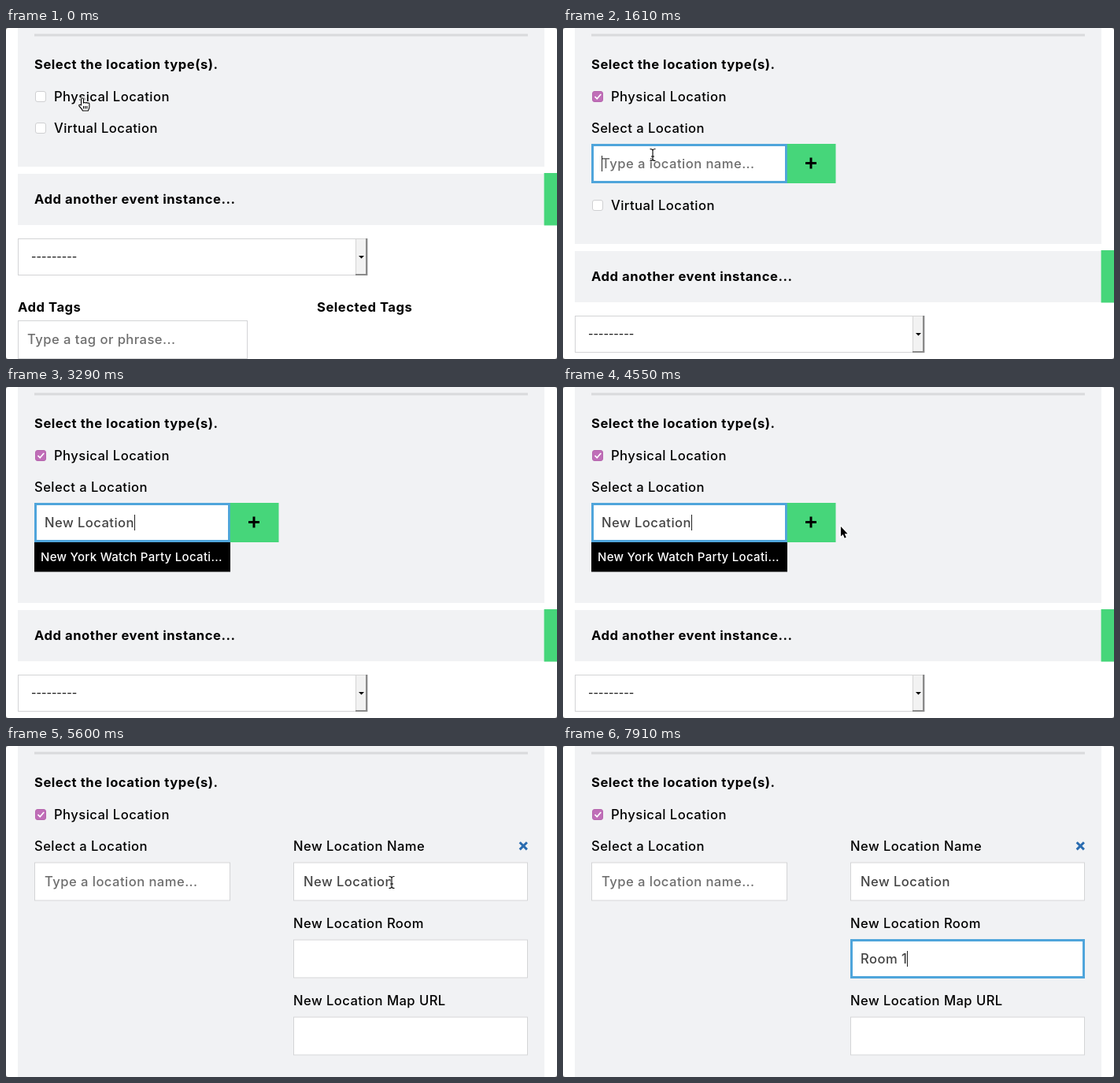
An HTML page with a canvas for the animation above (8000 ms loop, 700 by 420 pixels).

```html
<!DOCTYPE html>
<html lang="en">
<head>
<meta charset="utf-8">
<title>Event location form</title>
<style>
  html, body { margin: 0; width: 100%; height: 100%; overflow: hidden; background: #fff; }
  canvas { display: block; }
</style>
</head>
<body>
<canvas id="stage" width="700" height="420"></canvas>
<script>
const ctx = document.getElementById('stage').getContext('2d');
const LOOP = 8000;
const PANEL = '#f1f2f4', GREEN = '#46d67a', BLUE = '#4fa5db', BORDER = '#d3d4d6';
const HINT = '#6e6e6e', INK = '#444';

// Moments of the interaction, in ms
const CHECKED = 420, FOCUS_SEARCH = 1260, LIST_OPEN = 2170, LIST_NARROW = 2870;
const ADD_CLICK = 4900, FOCUS_ROOM = 6360;

const searchKeys = [[1890, 'N'], [2100, 'e'], [2170, 'w'],
  ...[...' Location'].map((c, i) => [2660 + i * 51, c])];
const roomKeys = [[7210, 'R'], [7420, 'o'], [7490, 'o'], [7560, 'm'], [7700, ' '], [7910, '1']];

// Asterisks mark the matching part of a suggestion
const suggestions = ['38th Meadow Park, *New* Harl...', '*New* York Watch Party Locati...',
  '*New*berry College', 'The Tinsmith Restaurant, 2...', 'Jonathan R. *New*lark Nature ...'];

// time, x, y, pointer shape until the next entry
const pointerPath = [
  [0, 97, 89, 'hand'], [70, 97, 89, 'hand'], [140, 101, 92, 'hand'], [490, 101, 92, 'hand'],
  [770, 108, 125, 'beam'], [1050, 114, 161, 'beam'], [1890, 114, 161, null],
  [4060, 114, 161, 'beam'], [4270, 288, 178, 'hand'], [4410, 348, 184, 'arrow'],
  [4550, 353, 177, 'arrow'], [4690, 344, 176, 'hand'], [4830, 318, 172, 'hand'],
  [4900, 318, 172, 'arrow'], [5110, 318, 172, 'arrow'], [5320, 368, 172, 'beam'],
  [5600, 490, 173, 'beam'], [5740, 490, 173, 'beam'], [6020, 484, 270, 'beam'],
  [6230, 477, 256, 'beam'], [7210, 477, 256, null], [LOOP, 477, 256, null]];

const shapes = {
  hand: new Path2D('M-1.5 9V1.5a1.5 1.5 0 0 1 3 0V6q1.3-1 2.6 0q1.3-.8 2.6.2q1.6-.6 2.2.8V11' +
    'q0 2-1.5 5h-7q-1-2.5-4.5-6q-.6-2 1-1.7zM1.5 10v3.5M3.7 10v3.5M5.9 10v3.5'),
  arrow: new Path2D('M0 0V12.5l2.8-2.6 2 4.8 2-.9-2-4.6h3.8z'),
  beam: new Path2D('M-3.5-7.5q3.5 0 3.5 2 0-2 3.5-2M0-5.5v11M-3.5 7.5q3.5 0 3.5-2 0 2 3.5 2M-2 2h4')
};

const clamp = v => Math.max(0, Math.min(1, v));
const progress = (t, start, length) => clamp((t - start) / length);
const swing = p => 0.5 - Math.cos(p * Math.PI) / 2;
const typed = (keys, t) => keys.filter(k => k[0] <= t).map(k => k[1]).join('');

function rect(x, y, w, h, color) {
  ctx.fillStyle = color;
  ctx.fillRect(x, y, w, h);
}

// Draws text centred on y and returns the x where it ends
function text(str, x, y, { color = '#000', weight = 500, size = 16.6, spacing = 0.45 } = {}) {
  ctx.font = `${weight} ${size}px Inter, sans-serif`;
  ctx.letterSpacing = spacing + 'px';
  ctx.fillStyle = color;
  ctx.fillText(str, x, y + size * 0.36);
  return x + ctx.measureText(str).width;
}

const heading = (str, x, y) => text(str, x, y, { weight: 700, spacing: 0.54 });

function stroke(path, color, width) {
  ctx.strokeStyle = color;
  ctx.lineWidth = width;
  ctx.stroke(path);
}

function field(x, y, w, h = 49, focus = 0) {
  rect(x, y, w, h, '#fff');
  ctx.strokeStyle = BORDER;
  ctx.lineWidth = 1;
  ctx.strokeRect(x + 0.5, y + 0.5, w - 1, h - 1);
  if (!focus) return;
  ctx.globalAlpha = focus;
  ctx.strokeStyle = BLUE;
  ctx.lineWidth = 3;
  ctx.strokeRect(x + 1.5, y + 1, w - 3, h - 2);
  ctx.globalAlpha = 1;
}

function caret(x, y, t, focusTime, keys) {
  const last = Math.max(focusTime, ...keys.map(k => k[0]).filter(k => k <= t));
  if (Math.floor((t - last) / 500) % 2 === 0) rect(Math.round(x), y - 10, 1, 20, '#222');
}

function checkbox(y, checked) {
  ctx.beginPath();
  ctx.roundRect(37.5, y - 6.5, 13, 13, 2.5);
  ctx.fillStyle = checked ? '#c06eb8' : '#fff';
  ctx.fill();
  ctx.strokeStyle = checked ? '#b565ad' : '#cfd0d2';
  ctx.lineWidth = 1;
  ctx.stroke();
  if (checked) stroke(new Path2D(`M40.5 ${y}l2.7 2.8 5-5.8`), '#fff', 1.7);
}

function clipped(height, draw) {
  ctx.save();
  ctx.beginPath();
  ctx.rect(0, 107, 700, height);
  ctx.clip();
  draw();
  ctx.restore();
}

function lowerPage(shift) {
  ctx.save();
  ctx.translate(0, shift);
  checkbox(127, false);
  text('Virtual Location', 61, 127);
  rect(15, 185, 669, 65, PANEL);
  rect(683.6, 184, 17, 66.5, GREEN);
  heading('Add another event instance...', 36, 217);
  field(15, 267, 445, 47);
  text('---------', 32, 290, { size: 14, spacing: 0, color: '#222' });
  rect(444, 267, 15, 47, '#8a8a8a');
  rect(444, 267, 13, 45, '#d5d5d5');
  rect(445, 268, 12, 44, '#f2f2f2');
  ctx.fillStyle = '#000';
  ctx.fill(new Path2D('M448 289h7l-3.5 3.5z'));
  heading('Add Tags', 15, 354);
  heading('Selected Tags', 395, 354);
  field(15, 371, 292);
  text('Type a tag or phrase...', 27, 395.5, { color: HINT });
  ctx.restore();
}

function searchColumn(t) {
  const active = t >= FOCUS_SEARCH && t < ADD_CLICK;
  const value = t < ADD_CLICK ? typed(searchKeys, t) : '';
  text('Select a Location', 36, 127);
  field(36, 147.5, 249, 49, active ? progress(t, FOCUS_SEARCH, 70) : 0);
  const end = value ? text(value, 49, 172, { color: INK }) : 49;
  if (!value) text('Type a location name...', 49, 172, { color: HINT });
  if (active) caret(end, 172, t, FOCUS_SEARCH, searchKeys);
  if (t < ADD_CLICK) {
    rect(284.8, 147, 61.7, 50, GREEN);
    stroke(new Path2D('M308 171.5h14M315 164.5v14'), '#000', 3);
  }
}

function newLocationColumn(t) {
  const focus = progress(t, FOCUS_ROOM, 70);
  ['Name', 'Room', 'Map URL'].forEach((name, i) => {
    text('New Location ' + name, 365, 127 + i * 98);
    field(365, 147.5 + i * 98, 298, 49, i === 1 ? focus : 0);
  });
  stroke(new Path2D('M652.7 122.2l9.2 9.2M661.9 122.2l-9.2 9.2'), '#2a6cb0', 3);
  text('New Location', 378, 172, { color: INK });
  const end = text(typed(roomKeys, t), 378, 270, { color: INK });
  if (t >= FOCUS_ROOM) caret(end, 270, t, FOCUS_ROOM, roomKeys);
}

function dropdown(t) {
  if (t < LIST_OPEN || t >= ADD_CLICK) return;
  const rows = t < LIST_NARROW ? suggestions : [suggestions[1].replaceAll('*', '')];
  const pitch = 38.5;
  rect(36, 197, 249, rows.length * pitch - 1, '#000');
  rows.forEach((row, i) => {
    let x = 44;
    if (i) rect(36, 196 + i * pitch, 249, 1, '#999');
    row.split('*').forEach((part, j) => {
      x = text(part, x, 215.5 + i * pitch,
        { color: '#fff', weight: j % 2 ? 700 : 500, size: 15, spacing: 0.3 });
    });
  });
}

function pointer(t) {
  const i = pointerPath.findLastIndex(p => p[0] <= t);
  const [t0, x0, y0, kind] = pointerPath[i];
  const [t1, x1, y1] = pointerPath[i + 1];
  if (!kind) return;
  const p = progress(t, t0, t1 - t0);
  ctx.save();
  ctx.translate(x0 + (x1 - x0) * p, y0 + (y1 - y0) * p);
  stroke(shapes[kind], '#fff', 2.6);
  if (kind !== 'beam') {
    ctx.fillStyle = kind === 'hand' ? '#fff' : '#000';
    ctx.fill(shapes[kind]);
  }
  if (kind !== 'arrow') stroke(shapes[kind], '#000', 1.1);
  ctx.restore();
}

function corners() {
  ctx.beginPath();
  ctx.rect(0, 0, 700, 420);
  ctx.roundRect(0, 0, 700, 420, 3);
  ctx.fillStyle = '#777';
  ctx.fill('evenodd');
}

function draw(t) {
  const searchHeight = 98 * swing(progress(t, CHECKED + 70, 400));
  const formHeight = 312 * swing(progress(t, ADD_CLICK, 400));
  const shift = Math.max(searchHeight, formHeight);

  rect(0, 0, 700, 420, '#fff');
  rect(15, 0, 669, 176 + shift, PANEL);
  rect(36, 7.5, 627, 3, '#d9dadc');
  heading('Select the location type(s).', 36, 46.5);
  checkbox(87, t >= CHECKED);
  text('Physical Location', 61, 87);
  lowerPage(shift);
  if (searchHeight) clipped(searchHeight, () => searchColumn(t));
  if (formHeight) clipped(formHeight, () => newLocationColumn(t));
  dropdown(t);
  pointer(t);
  corners();
}

function tick() {
  draw(performance.now() % LOOP);
  requestAnimationFrame(tick);
}
tick();
</script>
</body>
</html>
```
